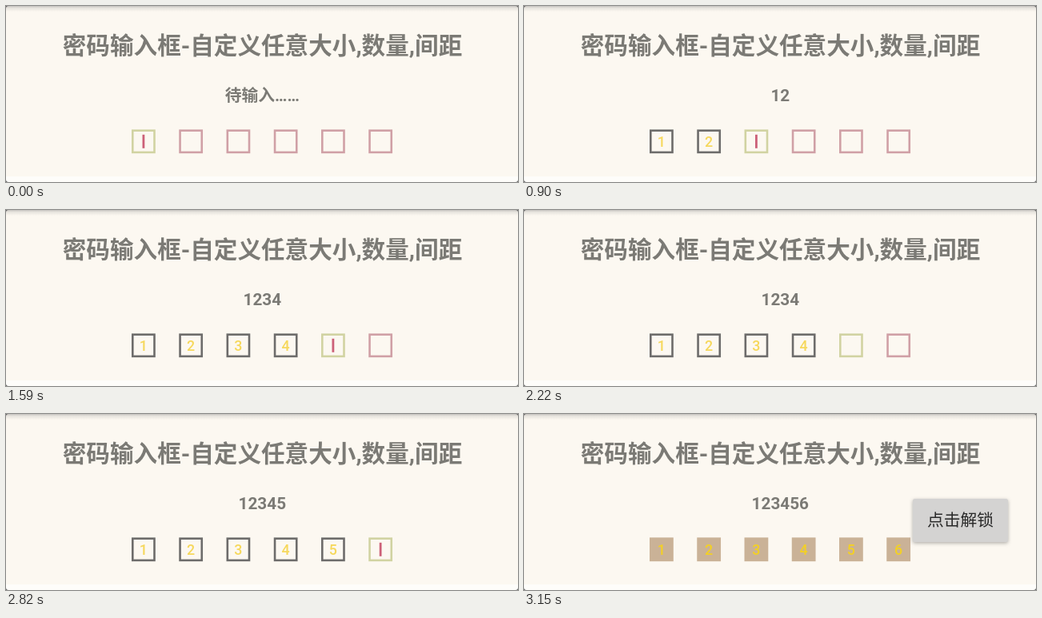
An HTML page with a canvas that plays this animation: 640 px wide and 220 px high, repeating every 3.75 s.

```html
<!DOCTYPE html>
<html lang="zh">
<head>
<meta charset="utf-8">
<style>
html, body { margin: 0; width: 100%; height: 100%; overflow: hidden; background: #fcf8f1; }
canvas { display: block; }
</style>
</head>
<body>
<canvas id="stage" width="640" height="220"></canvas>
<script>
const ctx = document.getElementById('stage').getContext('2d');
const LOOP = 3750;
const TYPED_AT = [720, 900, 1080, 1590, 2520, 2850];
const BLINK_START = 420, BLINK = 450, FLASH = 30;
const FIRST_X = 171.9, PITCH = 59.25, BOX_Y = 169.3, BOX = 27.2;
const FONT = 'Roboto, "Noto Sans CJK SC", "Noto Sans CJK", sans-serif';

function text(str, x, y, size, weight, color, embolden = 0) {
  ctx.font = `${weight} ${size}px ${FONT}`;
  ctx.textAlign = 'center';
  ctx.fillStyle = ctx.strokeStyle = color;
  ctx.fillText(str, x, y);
  if (embolden) {
    ctx.lineWidth = embolden;
    ctx.lineJoin = 'round';
    ctx.strokeText(str, x, y);
  }
}

function drawPage() {
  ctx.fillStyle = '#fcf8f1';
  ctx.fillRect(0, 0, 640, 220);
  const shade = ctx.createLinearGradient(0, 0, 0, 7);
  shade.addColorStop(0, '#c4c2be');
  shade.addColorStop(0.35, '#e6e3dd');
  shade.addColorStop(1, '#fcf8f1');
  ctx.fillStyle = shade;
  ctx.fillRect(0, 0, 640, 7);
  ctx.fillStyle = '#fefdfa';
  ctx.fillRect(0, 213, 640, 7);
  ctx.fillStyle = '#555';
  for (const [x, y, dx, dy] of [[0, 0, 1, 1], [640, 0, -1, 1], [0, 220, 1, -1], [640, 220, -1, -1]]) {
    ctx.beginPath();
    ctx.moveTo(x, y);
    ctx.lineTo(x + 3 * dx, y);
    ctx.quadraticCurveTo(x, y, x, y + 3 * dy);
    ctx.fill();
  }
  text('密码输入框-自定义任意大小,数量,间距', 320.5, 59.5, 29.6, 'bold', '#7b7a75');
}

function cursorVisible(t, count) {
  const sinceTyped = count ? t - TYPED_AT[count - 1] : Infinity;
  return sinceTyped < FLASH || Math.floor((t - BLINK_START) / BLINK) % 2 !== 0;
}

function drawBox(i, count, t) {
  const x = FIRST_X + i * PITCH;
  const full = count === TYPED_AT.length;
  if (full) {
    ctx.fillStyle = '#cab297';
    ctx.fillRect(x - 14.9, BOX_Y - 14.9, 29.8, 29.8);
  } else {
    ctx.strokeStyle = i < count ? '#6d6c6b' : i === count ? '#d1d3a2' : '#d0a0a6';
    ctx.lineWidth = 2.6;
    ctx.lineJoin = 'miter';
    ctx.strokeRect(x - BOX / 2, BOX_Y - BOX / 2, BOX, BOX);
  }
  if (i < count) {
    text(String(i + 1), x, 175.8, 17.8, 500, full ? '#f3d024' : '#f6d85c');
  } else if (i === count && cursorVisible(t, count)) {
    ctx.fillStyle = '#cc6078';
    ctx.fillRect(x - 1.4, 160.8, 2.8, 17);
  }
}

function drawButton() {
  ctx.save();
  ctx.shadowColor = 'rgba(0,0,0,.3)';
  ctx.shadowBlur = 4;
  ctx.shadowOffsetY = 1.5;
  ctx.fillStyle = '#d4d3d2';
  ctx.beginPath();
  ctx.roundRect(486, 106, 119, 54, 2.5);
  ctx.fill();
  ctx.restore();
  text('点击解锁', 545.5, 140.3, 20.76, 400, '#292929');
}

function draw(t) {
  const count = TYPED_AT.filter(at => t >= at).length;
  drawPage();
  text(count ? '123456'.slice(0, count) : '待输入……', 320.3, 119, 20.76, 'bold', '#7b7a75');
  for (let i = 0; i < TYPED_AT.length; i++) drawBox(i, count, t);
  if (count === TYPED_AT.length) drawButton();
}

const start = performance.now();
function frame() {
  draw((performance.now() - start) % LOOP);
  requestAnimationFrame(frame);
}
frame();
</script>
</body>
</html>
```
